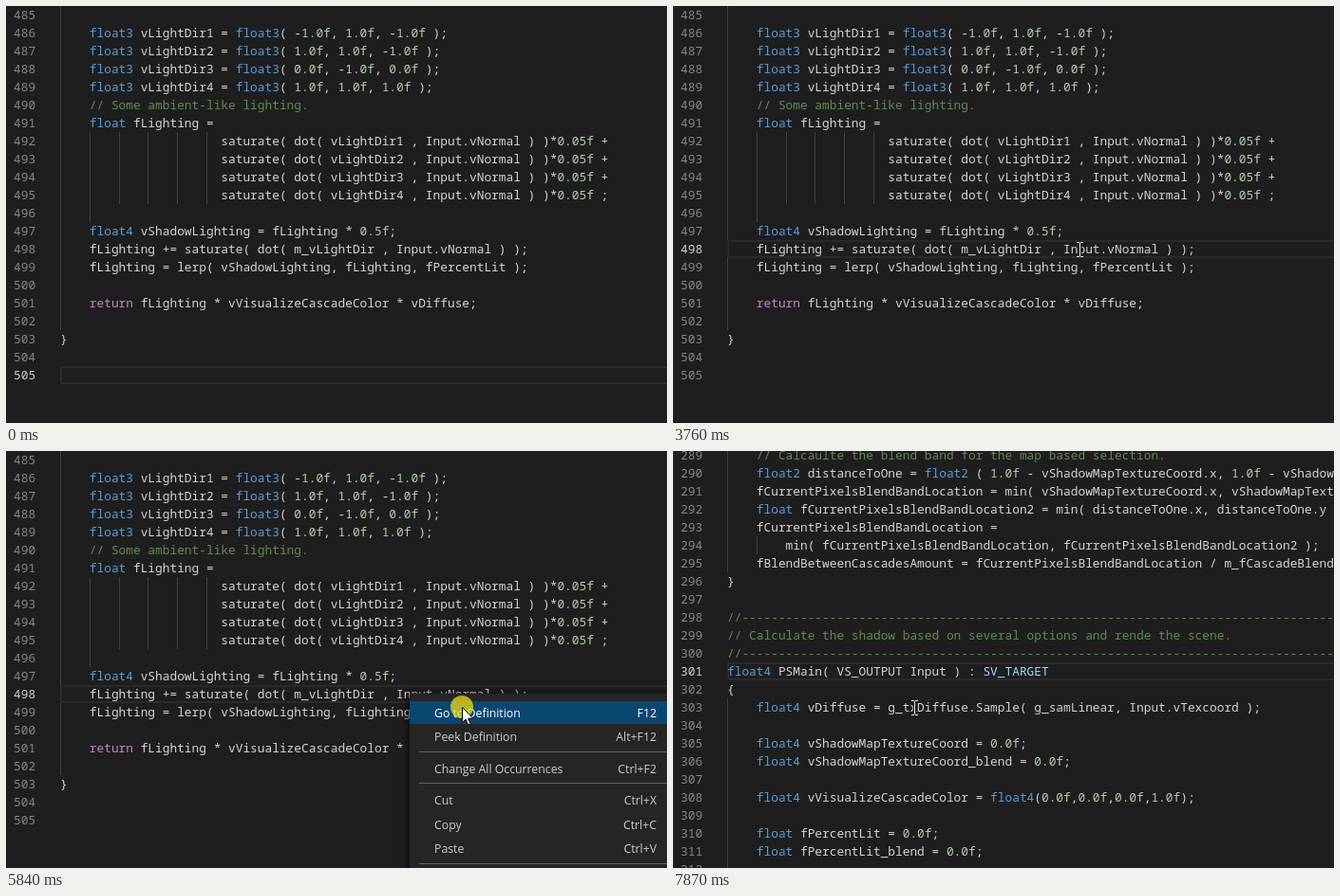
Recreate the animation shown at these times as an HTML page with a canvas. Size 696 by 440 pixels, loop 8000 ms.

```html
<!DOCTYPE html>
<html lang="en">
<head>
<meta charset="utf-8">
<style>
html, body { margin: 0; width: 100%; height: 100%; overflow: hidden; background: #1e1e1e; }
canvas { display: block; }
</style>
</head>
<body>
<canvas id="stage" width="696" height="440"></canvas>
<script>
const ctx = document.getElementById('stage').getContext('2d', { alpha: false });
const LOOP = 8000, LEFT = 57, CHAR = 7.697, ROW = 19;
const MONO = '12.83px "Noto Sans Mono", monospace';
const SANS = '12.3px "Open Sans", sans-serif';

const dashes = '//' + '-'.repeat(90);
const sum = (n, end) => ' '.repeat(22) + `saturate( dot( vLightDir${n} , Input.vNormal ) )*0.05f ${end}`;

const lighting = {
  first: 485, top: 0,
  guides: [[0, 485, 502], [4, 492, 496], [8, 492, 495], [12, 492, 495], [16, 492, 495], [20, 492, 495]],
  lines: `
    float3 vLightDir1 = float3( -1.0f, 1.0f, -1.0f );
    float3 vLightDir2 = float3( 1.0f, 1.0f, -1.0f );
    float3 vLightDir3 = float3( 0.0f, -1.0f, 0.0f );
    float3 vLightDir4 = float3( 1.0f, 1.0f, 1.0f );
    // Some ambient-like lighting.
    float fLighting =
${sum(1, '+')}
${sum(2, '+')}
${sum(3, '+')}
${sum(4, ';')}

    float4 vShadowLighting = fLighting * 0.5f;
    fLighting += saturate( dot( m_vLightDir , Input.vNormal ) );
    fLighting = lerp( vShadowLighting, fLighting, fPercentLit );

    return fLighting * vVisualizeCascadeColor * vDiffuse;

}

`.split('\n')
};

const shader = {
  first: 289, top: -5,
  guides: [[0, 289, 295], [4, 294, 294], [0, 303, 312]],
  lines: `    // Calcaulte the blend band for the map based selection.
    float2 distanceToOne = float2 ( 1.0f - vShadowMapTextureCoord.x, 1.0f - vShadowMapTextureCoord.y );
    fCurrentPixelsBlendBandLocation = min( vShadowMapTextureCoord.x, vShadowMapTextureCoord.y );
    float fCurrentPixelsBlendBandLocation2 = min( distanceToOne.x, distanceToOne.y );
    fCurrentPixelsBlendBandLocation =
        min( fCurrentPixelsBlendBandLocation, fCurrentPixelsBlendBandLocation2 );
    fBlendBetweenCascadesAmount = fCurrentPixelsBlendBandLocation / m_fCascadeBlendArea;
}

${dashes}
// Calculate the shadow based on several options and rende the scene.
${dashes}
float4 PSMain( VS_OUTPUT Input ) : SV_TARGET
{
    float4 vDiffuse = g_txDiffuse.Sample( g_samLinear, Input.vTexcoord );

    float4 vShadowMapTextureCoord = 0.0f;
    float4 vShadowMapTextureCoord_blend = 0.0f;

    float4 vVisualizeCascadeColor = float4(0.0f,0.0f,0.0f,1.0f);

    float fPercentLit = 0.0f;
    float fPercentLit_blend = 0.0f;
`.split('\n')
};

// [label, shortcut, baseline]
const menuItems = [
  ['Go to Definition', 'F12', 281], ['Peek Definition', 'Alt+F12', 306],
  ['Change All Occurrences', 'Ctrl+F2', 340],
  ['Cut', 'Ctrl+X', 373], ['Copy', 'Ctrl+C', 399], ['Paste', 'Ctrl+V', 424]
];

const TOKEN = /\/\/.*|\bfloat\d?\b|\breturn\b|\bSV_\w+|\b\d+\.\d+f|^}|[^\s]/g;
function tint(s) {
  if (s.startsWith('//')) return '#608b4e';
  if (s.startsWith('float')) return '#569cd6';
  if (s === 'return') return '#c586c0';
  if (s.startsWith('SV_')) return '#9cdcfe';
  if (/^\d+\./.test(s)) return '#b5cea8';
  return '#d4d4d4';
}

function rect(x, y, w, h, color) {
  ctx.fillStyle = color;
  ctx.fillRect(x, y, w, h);
}

function text(s, x, y, color, font = MONO, align = 'left') {
  ctx.font = font;
  ctx.textAlign = align;
  ctx.fillStyle = color;
  ctx.fillText(s, x, y);
}

function drawCode(doc, active) {
  const rowTop = n => doc.top + (n - doc.first) * ROW;
  for (const [col, a, b] of doc.guides)
    rect(Math.round(LEFT + col * CHAR), rowTop(a), 1, (b - a + 1) * ROW, '#404040');
  ctx.strokeStyle = '#2a2a2a';
  ctx.lineWidth = 2;
  ctx.strokeRect(LEFT + 1, rowTop(active) + 1, 700, ROW - 2);
  doc.lines.forEach((line, i) => {
    const n = doc.first + i, y = rowTop(n) + 14;
    text(n, 8, y, n === active ? '#d0d0d0' : '#858585');
    for (const m of line.matchAll(TOKEN))
      text(m[0], LEFT + m.index * CHAR, y, tint(m[0]));
  });
}

function drawHover(alpha) {
  ctx.globalAlpha = alpha;
  rect(411, 220, 226, 29, '#454545');
  rect(412, 221, 224, 27, '#2d2d30');
  text('(parameter) VS_OUTPUT Input', 420, 239, '#d4d4d4');
  ctx.globalAlpha = 1;
}

function drawMenu(picked) {
  ctx.shadowColor = '#000';
  ctx.shadowBlur = 8;
  ctx.shadowOffsetY = 2;
  rect(425, 256, 300, 220, '#252526');
  ctx.shadowColor = 'transparent';
  if (picked) rect(425, 264, 271, 24, '#094771');
  for (const y of [317, 350, 435]) rect(435, y, 261, 1, '#616162');
  menuItems.forEach(([label, key, y], i) => {
    const color = picked && i === 0 ? '#fff' : '#ccc';
    text(label, 451, y, color, SANS);
    text(key, 685, y, color, SANS, 'right');
  });
}

function drawBeam([x, y]) {
  x = Math.round(x);
  y = Math.round(y) - 8;
  const part = (dx, dy, w, h) => rect(x + dx, y + dy, w, h, '#e8e8e8');
  rect(x - 1, y + 1, 3, 14, '#1e1e1e');
  part(0, 1, 1, 14);
  for (const dy of [0, 15]) {
    part(-3, dy, 3, 1);
    part(1, dy, 3, 1);
  }
}

function drawArrow([x, y]) {
  ctx.save();
  ctx.translate(Math.round(x) + 0.5, Math.round(y) + 0.5);
  const shape = new Path2D('M0 0V16L3.6 12.6L6.2 18.4L8.6 17.4L6.1 11.7H11.2Z');
  ctx.fillStyle = '#fff';
  ctx.fill(shape);
  ctx.strokeStyle = '#000';
  ctx.lineWidth = 1;
  ctx.stroke(shape);
  ctx.restore();
}

// Progress from 0 to 1 in even steps, as the pointer is sampled.
const stepped = (t, a, b, n) =>
  Math.min(1, Math.max(0, Math.floor((t - a) / (b - a) * n + 1e-6) / n));
const easeOut = (u, p) => 1 - (1 - u) ** p;
const smooth = u => u * u * (3 - 2 * u);
const mix = ([x, y], [X, Y], u) => [x + (X - x) * u, y + (Y - y) * u];
const within = (t, spans) => spans.some(([a, b]) => t >= a && t < b);

function beamAt(t) {
  if (t >= 2670 && t < 2750) return [428, 253];
  return mix([201, 424], [428, 257], easeOut(stepped(t, 1830, 2580, 10), 1.83));
}

function arrowAt(t) {
  if (t >= 5230) return [480, t < 5380 ? 272 : t < 5550 ? 271 : 270];
  return mix([425, 255], [480, 273], easeOut(stepped(t, 4304, 4840, 7), 1.7));
}

function drawLighting(t) {
  const clicked = t >= 3760, menu = t >= 3830;
  const hover = t >= 2890 && !clicked;
  if (hover) rect(411, 247, 39, ROW, '#202a35');
  drawCode(lighting, clicked ? 498 : 505);
  if (within(t, [[410, 870], [1430, 1905], [2430, 2890], [3360, 3760]]))
    rect(LEFT, 380, 2, ROW, '#aeafad');
  if (hover) drawHover(t < 2980 ? 0.2 : t < 3040 ? 0.6 : 1);
  if (!menu) {
    if (t >= 1830) drawBeam(beamAt(t));
    return;
  }
  drawMenu(t >= 4530);
  if (t >= 5840) {
    ctx.fillStyle = 'rgba(235, 222, 20, 0.75)';
    ctx.beginPath();
    ctx.arc(480, 270, 12, 0, Math.PI * 2);
    ctx.fill();
  }
  drawArrow(arrowAt(t));
}

function drawShader(t) {
  drawCode(shader, 301);
  if (within(t, [[5990, 6530], [7010, 7510]])) rect(248, 223, 2, ROW, '#aeafad');
  drawBeam(mix([482, 271], [254, 271], smooth(stepped(t, 7010, 7870, 11))));
}

function frame(now) {
  const t = now % LOOP;
  rect(0, 0, 696, 440, '#1e1e1e');
  (t < 5990 ? drawLighting : drawShader)(t);
  requestAnimationFrame(frame);
}
requestAnimationFrame(frame);
</script>
</body>
</html>
```
